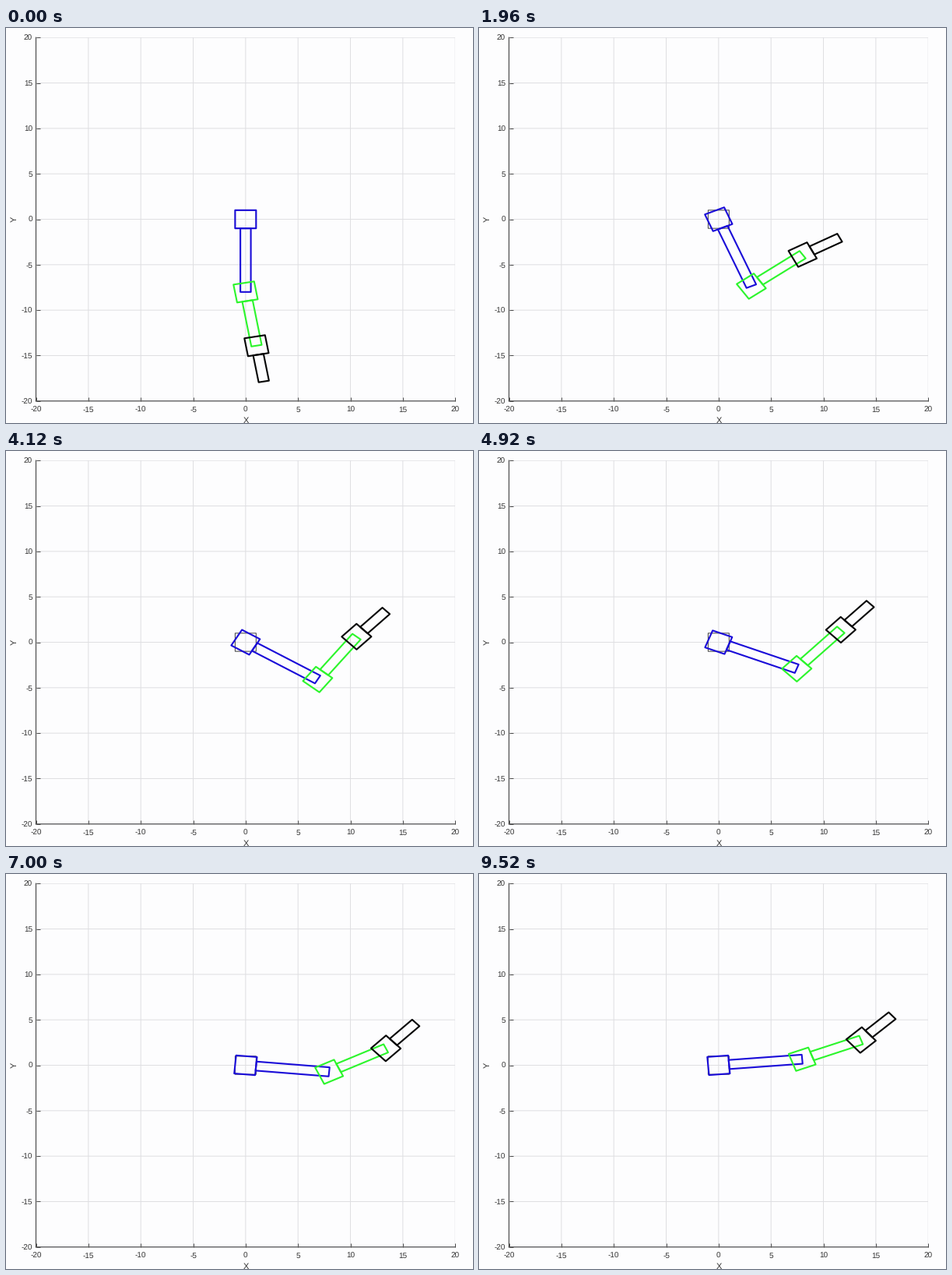
Animation, 600 px wide and 507 px high, one loop 9560 ms. Source, as a matplotlib script:

```python
import numpy as np
import matplotlib.pyplot as plt
from matplotlib.animation import FuncAnimation

W, H, DPI = 600, 507, 64
PX = 72 / DPI                      # one pixel in points
FRAMES, STEP = 239, 40
PAPER, INK, GRID, TEXT = "#fdfdfe", "#4c4c4c", "#dfdfe2", "#333333"

plt.rcParams.update({
    "font.family": "Liberation Sans",
    "text.hinting": "none",
    "path.snap": False,
})

# Length and colour of each link, from the base outwards
LINKS = [(8, "#1a0cd8"), (6, "#2cf52c"), (4, "#050505")]


def pose(n):
    """Absolute link angles in radians at frame n."""
    base = 20 - 110 / (1 + (n / 95.4) ** 2)
    middle = (20.5 + 32.5 * np.exp(-((n - 92) / 43) ** 2 / 2)
              - 103.8 * np.exp(-n / 16))
    tip = 46 - 126 * np.exp(-(n / 30.9) ** 1.43) - 4 * (n / FRAMES) ** 3
    return np.radians([base, middle, tip])


def box(x0, y0, x1, y1):
    return np.array([(x0, y0), (x1, y0), (x1, y1), (x0, y1)], float)


def outline(points, color, width, z):
    return ax.add_patch(plt.Polygon(points, closed=True, fill=False, ec=color,
                                    lw=width * PX, joinstyle="round",
                                    zorder=z))


fig = plt.figure(figsize=(W / DPI, H / DPI), dpi=DPI, facecolor=PAPER)
left, right, top, bottom = 38.5, 577.2, 12.2, 478.8
ax = fig.add_axes([left / W, 1 - bottom / H, (right - left) / W,
                   (bottom - top) / H], facecolor=PAPER)
ax.set(xlim=(-20, 20), ylim=(-20, 20))

ticks = range(-20, 21, 5)
labels = [str(t) for t in ticks]
ax.set_xticks(ticks, labels)
ax.set_yticks(ticks, labels)
ax.set_axisbelow(True)
ax.grid(color=GRID, lw=PX)
ax.tick_params(direction="in", length=5 * PX, width=PX, color=INK,
               labelcolor=TEXT, labelsize=10 * PX)
ax.tick_params(axis="x", pad=7 * PX)
ax.tick_params(axis="y", pad=4.5 * PX)
ax.spines[["top", "right"]].set_visible(False)
ax.spines[["left", "bottom"]].set(color=INK, linewidth=1.2 * PX)

for x, y, name, turn in ((308, 504.5, "X", 0), (11, 245, "Y", 90)):
    fig.text(x / W, 1 - y / H, name, size=11 * PX, color=TEXT,
             rotation=turn, ha="center", va="center")

outline(box(-1, -1, 1, 1), "#404040", 1, 3)

parts = []
for k, (length, color) in enumerate(LINKS):
    for shape in (box(-1, -1, 1, 1), box(1, -0.5, length, 0.5)):
        parts.append((k, shape, outline(shape, color, 2.1, 4 + k)))


def draw(n):
    joint = np.zeros(2)
    frames = []
    for (length, _), a in zip(LINKS, pose(n)):
        c, s = np.cos(a), np.sin(a)
        frames.append((joint, np.array([(c, s), (-s, c)])))
        joint = joint + length * np.array([c, s])
    for k, shape, patch in parts:
        origin, turn = frames[k]
        patch.set_xy(origin + shape @ turn)
    return [patch for _, _, patch in parts]


anim = FuncAnimation(fig, draw, frames=FRAMES, interval=STEP,
                     init_func=lambda: draw(0), repeat=True, repeat_delay=0)
plt.show()
```
